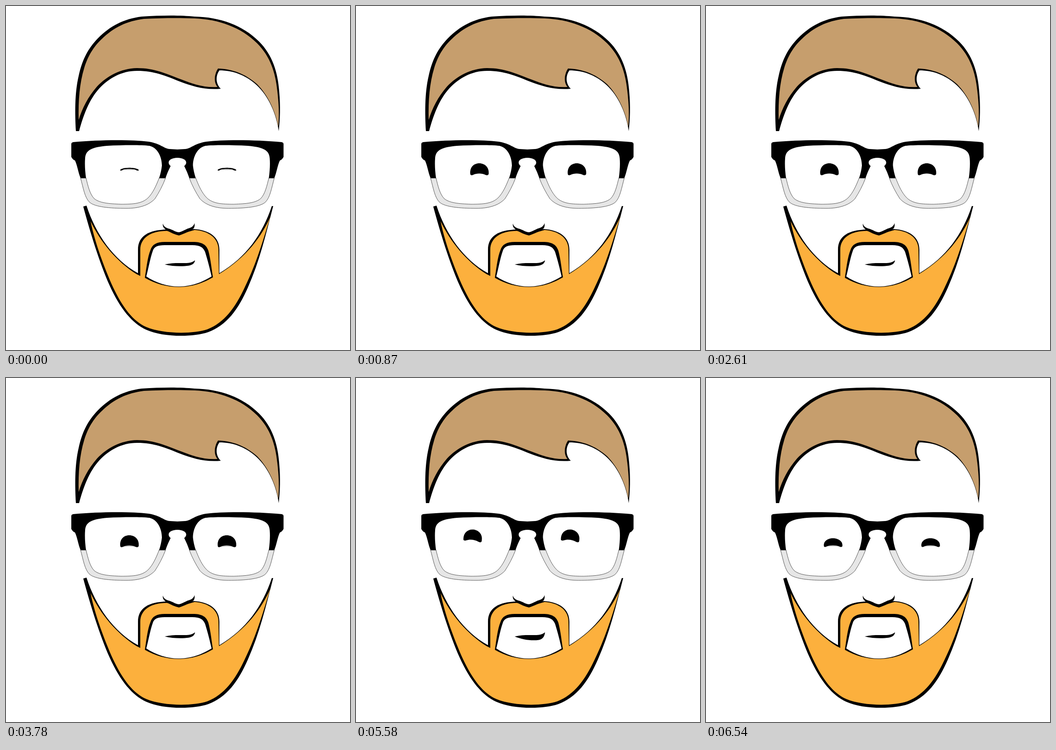
These frames come from a looping animation (748 px wide and 748 px high, 6.57 s). An HTML page with a canvas:

```html
<!DOCTYPE html>
<html lang="en">
<head>
<meta charset="utf-8">
<title>Bearded face</title>
<style>
html, body { margin: 0; width: 100%; height: 100%; overflow: hidden; background: #fff; }
canvas { display: block; width: 748px; height: 748px; }
</style>
</head>
<body>
<canvas id="stage" width="748" height="748"></canvas>
<script>
const ctx = document.getElementById('stage').getContext('2d');
const LOOP = 6570;
const INK = '#000', BROWN = '#c69e6d', ORANGE = '#fcb03d', CLEAR = '#e6e6e6';

const hairEdge = new Path2D(`M152 272 C150 235 149 190 158 152 C166 116 178 93 200 70
  C226 44 255 28 295 23 C340 20 380 20 410 23 C465 24 515 42 550 77
  C580 107 591 145 594 185 C597 220 596 245 593 272
  C588 235 571 196 545 172 C520 149 492 140 464 140 C456 151 455 168 467 180
  C430 183 405 174 380 165 C345 151 322 141 285 141 C251 141 224 157 203 179
  C181 203 168 238 159 272 Z`);
const hairFill = new Path2D(`M158 248 C157 205 160 168 170 135 C179 105 194 85 208 72
  C235 46 262 33 300 28 C340 26 380 26 410 27 C462 29 511 46 546 81
  C575 110 586 145 590 185 C594 220 594 240 592 262
  C586 230 570 194 546 170 C520 147 492 137 461 136 C452 150 452 167 460 176
  C430 178 405 169 382 160 C345 146 322 135 285 135 C249 136 220 152 198 175
  C178 198 166 222 158 248 Z`);

const beardEdge = new Path2D(`M168 436 L175 434 C195 496 234 552 287 581 L287 530
  C287 500 310 487 350 486 L376 495 L408 485 C442 487 464 502 464 530 L464 581
  C523 546 557 497 578 435 L581 435 C565 497 551 556 526 612
  C505 660 480 694 440 709 C405 721 340 720 305 704
  C275 690 249 660 225 607 C204 560 183 492 168 436 Z`);
const beardFill = new Path2D(`M184 468 C205 513 242 557 284 583 L292 587 L292 530
  C292 504 315 489 350 489 L376 497 L410 487 C440 489 462 504 462 530 L463 583
  C524 546 556 500 575 458 C560 505 546 557 519 612
  C498 657 475 688 438 703 C405 714 340 713 305 698
  C276 685 254 656 233 612 C214 570 193 514 184 468 Z`);
const gapEdge = new Path2D(`M302 591 C306 565 308 546 314 531 C318 518 328 513 345 513
  L410 513 C428 514 436 520 440 532 C445 550 447 572 450 590
  C422 606 398 611 375 611 C350 611 324 604 302 591 Z`);
const gapFill = new Path2D(`M305 588 C310 570 313 550 319 533 C322 523 330 520 345 520
  L405 520 C422 520 429 525 433 535 C438 551 443 570 447 588
  C420 605 395 610 375 610 C352 610 325 602 305 588 Z`);
const nose = new Path2D(`M341 473 C343 481 350 483 357 485 C365 488 370 492 376 492
  C382 491 388 487 395 484 C403 482 408 479 410 472 C411 480 409 485 402 488
  C392 493 382 497 376 499 C368 497 358 493 350 488 C344 484 340 480 341 473 Z`);

// Left half of the glasses; the right half is its mirror.
const rim = new Path2D(`M373.5 312 L356 311 C343 310 336 299 310 295 C270 290 200 291 146 296
  Q142 297 142 300 L142 328 Q144 333 150 336 C155 346 157 362 162 374
  C168 395 171 417 182 427 C194 437 225 440 262 440
  C288 440 310 434 324 419 C333 405 341 390 347 374 C351 362 355 354 358 348
  C349 341 354 330 373.5 330 Z
  M174 374 C172 360 171 345 172 332 C173 312 188 307 220 304
  C255 302 295 302 312 304 C329 308 339 327 339 347 C338 356 336 365 333 374
  C326 392 319 407 309 417 C296 430 275 431 250 431
  C222 430 203 428 192 419 C182 409 178 390 174 374 Z`);

const mix = (a, b, k) => a + (b - a) * k;
const clamp = x => Math.max(0, Math.min(1, x));
const progress = (t, from, to) => clamp((t - from) / (to - from));
const ease = x => x * x * (3 - 2 * x);

function fill(path, color) {
  ctx.fillStyle = color;
  ctx.fill(path, 'evenodd');
}

function halfGlasses() {
  ctx.save();
  ctx.beginPath();
  ctx.rect(100, 374, 274, 90);
  ctx.clip();
  fill(rim, CLEAR);
  ctx.strokeStyle = '#444';
  ctx.lineWidth = 0.9;
  ctx.stroke(rim);
  ctx.restore();

  ctx.save();
  ctx.beginPath();
  ctx.rect(100, 280, 274, 94.5);
  ctx.clip();
  fill(rim, INK);
  ctx.restore();
}

function glasses() {
  halfGlasses();
  ctx.save();
  ctx.translate(745.5, 0);
  ctx.scale(-1, 1);
  halfGlasses();
  ctx.restore();
}

function eyeShape(open, sag) {
  const y = (shut, wide) => mix(shut, wide, open);
  const top = y(-3, -13), side = y(0, -4), corner = y(2.5, 10);
  const lip = y(3, 13.5), inner = y(0.5, 12), arch = y(-1.5, 8.2) + sag;
  ctx.beginPath();
  ctx.moveTo(-19.5, corner);
  ctx.bezierCurveTo(-21, side, -12, top, 0, top);
  ctx.bezierCurveTo(12, top, 22, side, 20.5, corner);
  ctx.bezierCurveTo(20, lip, 16, lip, 13, inner);
  ctx.bezierCurveTo(6, arch, -6, arch, -13, inner);
  ctx.bezierCurveTo(-16, lip, -19.5, lip, -19.5, corner);
  ctx.fill();
}

function eye(x, y, open, tilt) {
  ctx.save();
  ctx.translate(x, y);
  ctx.rotate(tilt);
  if (open > 0 && open < 1) {
    ctx.fillStyle = '#bbb';
    eyeShape(open, 3);
  }
  ctx.fillStyle = INK;
  eyeShape(open, 0);
  ctx.restore();
}

function mouth(grin) {
  const low = d => d * grin;
  ctx.fillStyle = INK;
  ctx.beginPath();
  ctx.moveTo(345, 562);
  ctx.bezierCurveTo(365, 557, 385, 560, 398, 558.5);
  ctx.bezierCurveTo(405, 557.5, 408, 555, 411, 553);
  ctx.bezierCurveTo(410, 560 + low(3), 405, 563 + low(5), 398, 564.5 + low(5));
  ctx.bezierCurveTo(382, 567 + low(5), 362, 566 + low(3), 345, 562);
  ctx.fill();
}

// Lids fall with a late snap and rise with a soft finish.
const closing = (t, start) => 1 - progress(t, start, start + 150) ** 5;
const opening = (t, start) => 1 - (1 - progress(t, start, start + 180)) ** 3;

function lids(t) {
  if (t < 180) return opening(t, 0);
  if (t < 3870) return closing(t, 3720);
  if (t < 4050) return opening(t, 3870);
  return closing(t, 6420);
}

function draw(t) {
  const up = ease(progress(t, 5280, 5520));
  const back = ease(progress(t, 5960, 6210));
  const dx = mix(-14 * up, 8, back);
  const dy = mix(-12.5 * up, 3, back);
  const glance = up * (1 - back);
  const open = lids(t);

  ctx.fillStyle = '#fff';
  ctx.fillRect(0, 0, 748, 748);
  fill(hairEdge, INK);
  fill(hairFill, BROWN);
  fill(beardEdge, INK);
  fill(beardFill, ORANGE);
  fill(gapEdge, INK);
  fill(gapFill, '#fff');
  fill(nose, INK);
  mouth(glance);
  for (const x of [268, 480]) eye(x + dx, 355 + dy, open, 0.11 * glance);
  glasses();
}

const start = performance.now();
function tick() {
  draw((performance.now() - start) % LOOP);
  requestAnimationFrame(tick);
}
tick();
</script>
</body>
</html>
```
